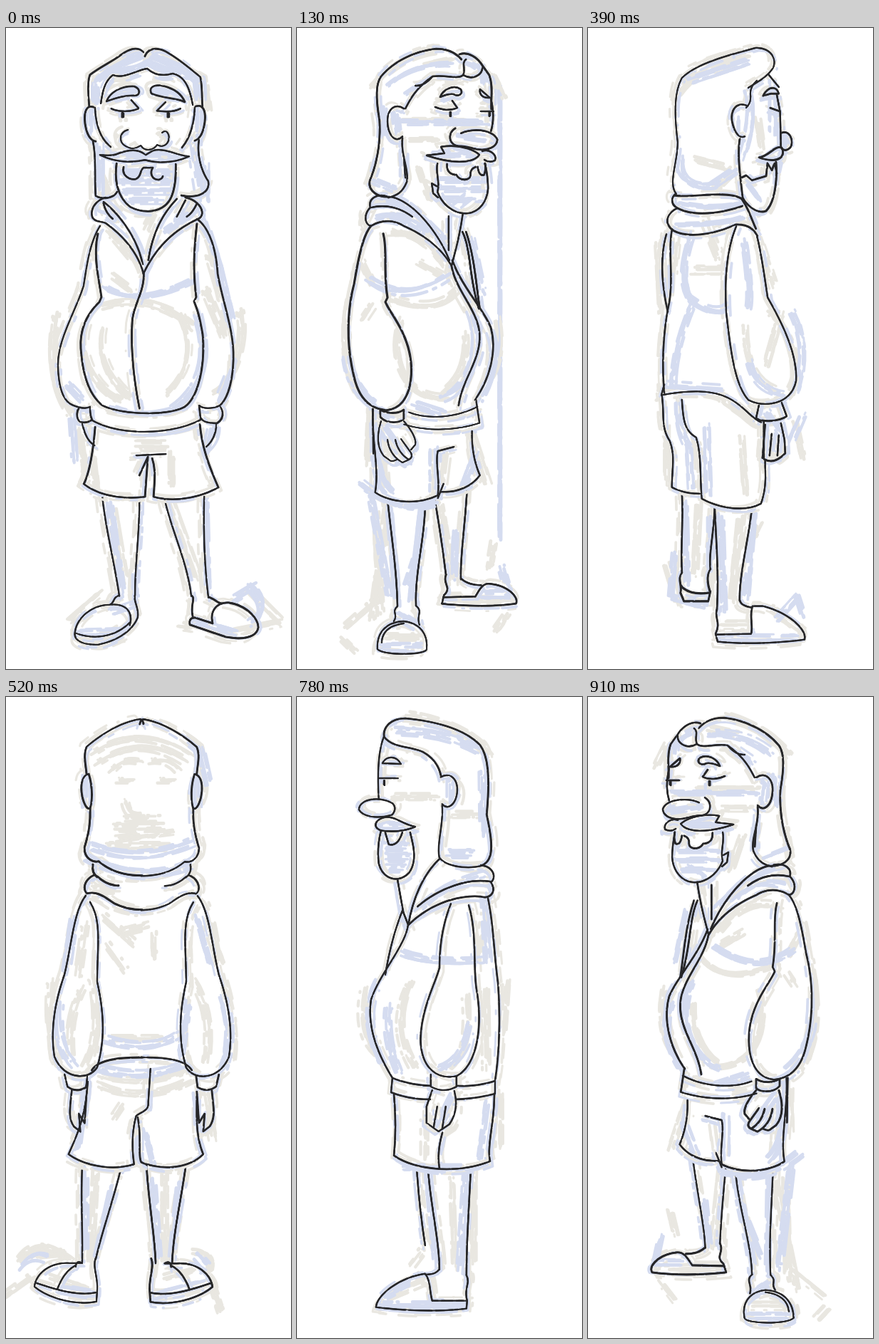
Animation, 400 px wide and 900 px high, one loop 1.04 s. Source, as an HTML page with a canvas:

```html
<!DOCTYPE html>
<html lang="en">
<head>
<meta charset="utf-8">
<title>Character turnaround</title>
<style>
html, body { margin: 0; height: 100%; overflow: hidden; background: #fff; }
canvas { display: block; width: 100vw; height: 100vh; }
</style>
</head>
<body>
<canvas id="stage" width="400" height="900"></canvas>
<script>
const W = 400, H = 900, STEP = 130;
const INK = '#262628', BLUE = '#d5dcf0', BEIGE = '#e9e7e1';
const stage = document.getElementById('stage').getContext('2d');

// Every view has an upper body and legs; each holds ink, blue and beige strokes.
const front = {
  top: {
    ink: [
      'M117,111C116,95 114,76 118,66C132,55 148,48 160,39C172,30 184,25 193,34M195,40C200,28 212,27 224,33C242,43 262,60 273,69C276,84 275,100 276,111',
      'M133,106C135,92 137,76 150,66C164,72 182,60 198,57C210,68 222,67 234,64C252,68 258,86 262,108',
      'M123,111C113,107 109,118 111,134C113,148 118,158 126,159M266,110C277,106 281,117 279,132C277,147 272,156 265,158',
      'M125,112C126,138 133,156 147,167M265,112C264,138 257,156 247,168',
      'M122,159C127,180 124,212 126,236C138,242 152,238 156,230M271,157C267,180 276,204 284,215C287,231 270,240 246,235',
      'M141,103C146,90 162,81 180,82C190,86 188,95 180,95C166,94 152,99 141,103ZM204,92C200,84 207,79 218,81C234,84 246,92 251,104C239,98 220,99 204,92Z',
      'M148,113C158,118 175,118 186,113M176,101L186,112M212,116C225,118 238,117 245,113M213,115L224,104',
      'M164,119v6m-1,-6v6m2,-5v5M228,119v6m-1,-6v6m2,-5v5',
      'M171,143C159,146 157,160 168,166C177,172 184,168 189,165C194,174 207,172 212,164C222,170 231,160 228,150C226,144 222,144 219,147',
      'M132,178C150,187 172,190 195,185C216,191 240,188 257,180C240,179 222,167 206,172L196,178C185,168 170,171 155,177C146,180 138,178 132,178Z',
      'M165,195C162,206 172,214 182,212C191,208 187,200 193,196H206C201,204 205,213 214,213Q219,212 220,208',
      'M155,190C151,218 159,240 174,251C187,258 206,260 219,252C233,244 239,224 238,191',
      'M140,238C124,242 117,258 122,267C127,273 133,271 140,274C164,291 186,316 193,345M137,244C163,264 186,300 192,332',
      'M252,238C272,242 281,260 272,267C240,282 214,302 193,345M240,240C216,265 205,294 200,326M137,246Q140,260 150,268M252,242L240,265M268,247Q262,260 254,265'
    ].concat([
      'M193,345C194,370 180,386 177,410C174,452 180,500 187,534',
      'M132,278C118,300 114,330 109,362C97,400 72,438 73,475C74,505 80,525 95,530C105,534 112,535 118,532',
      'M129,289C122,320 130,350 134,378L131,385C117,398 103,420 105,450C108,490 117,515 135,530C160,543 226,546 251,532C271,518 280,470 276,430C271,402 269,396 264,384L267,378C262,340 264,310 268,275',
      'M268,268C285,280 295,310 297,345C303,380 318,420 319,455C320,490 312,520 300,530C290,535 276,535 271,530',
      'M102,534C98,541 100,550 104,553C112,555 118,553 120,550M301,532C307,541 304,550 296,555C285,555 276,553 274,548',
      'M118,532Q117,543 121,551C160,574 235,571 273,550L271,532M107,556C110,571 116,582 124,586M295,556C295,571 288,582 281,588',
      'M125,560C122,600 115,630 109,640C130,657 165,662 195,658L199,602M183,600L224,598M199,602L187,628M205,604C211,622 208,640 207,658C236,666 270,660 298,645C285,615 275,590 272,556'
    ]),
    blue: ['M126,75Q150,55 188,42M205,42Q245,55 265,75L268,100M124,85L127,105M150,61Q180,64 197,50Q225,64 255,70', 'M117,115V148M273,115V148M150,98Q162,87 182,88M210,87Q230,86 245,97', 'M162,205H232M161,218H233M165,232H227M174,245H216', 'M150,181H243M131,168V228M262,170L270,222M279,195V238', 'M282,272L300,330L318,405M128,255L150,262M268,255L225,285', 'M140,365Q185,392 260,355M268,405C290,460 270,510 235,532M150,533Q195,550 245,532', 'M93,545L97,605M289,560L280,600M86,500L105,520M300,520L320,470'],
    beige: ['M115,62L170,32M220,30L278,65L284,110M145,65L175,55M130,192L145,230', 'M116,420C102,460 130,510 165,522M248,405C268,450 255,490 230,512M138,425C130,460 150,498 178,518M140,390Q210,370 265,420', 'M70,405C58,470 72,515 90,540M328,400C337,440 320,500 295,510M280,370L305,430M150,290L175,320M285,320L300,370', 'M120,600L125,645M183,585H222M230,600V640M102,570L110,625M150,350L170,365M195,280L205,260']
  },
  legs: {
    ink: [
      'M135,658C140,705 152,750 159,798M187,658C188,705 181,750 181,797M222,660C232,705 255,752 260,798M278,658C277,705 278,752 284,800',
      'M159,797C149,800 154,806 146,810M181,797C179,806 187,814 185,828C179,844 160,860 130,866C108,867 94,860 97,848C100,827 122,810 146,810C168,808 179,819 174,839M98,850C124,860 155,855 174,835',
      'M260,797C267,801 258,808 262,826M284,799C295,803 296,807 302,808M290,836C285,818 297,806 312,807C336,810 354,828 354,842C351,858 328,859 308,855L258,838Q256,828 265,828L290,836'
    ],
    blue: ['M145,670L162,790M279,665L282,790M180,770V800M103,850L165,848M150,820L180,810M265,834L320,850', 'M345,785Q375,815 345,835M325,800L350,785'],
    beige: ['M150,680L166,775M230,665L268,770M90,830L130,795M105,862L165,856M340,790L385,835L300,852M260,842L245,840']
  }
};

const quarter = {
  top: {
    ink: [
      'M130,237C108,238 97,223 104,210C112,190 118,160 116,130C111,100 110,80 118,68C137,45 168,32 195,29C214,29 224,36 231,44M228,37C240,32 254,42 260,52L270,66C276,82 272,100 273,114',
      'M152,113C157,104 164,86 190,68C208,65 225,73 233,66C237,57 230,49 237,44M233,66C246,74 261,66 260,54M190,68Q178,82 166,81',
      'M150,113C137,104 126,115 127,132C128,152 139,162 148,152M148,154C145,178 158,200 154,216C148,231 140,235 128,238M150,180L152,210',
      'M201,97C205,86 220,79 230,86C234,93 226,97 220,93C212,92 206,95 201,97ZM257,86L271,98C260,99 256,93 257,86ZM194,111C205,116 218,116 225,112L218,102M258,117H276M215,118v6m1,-6v6M270,118v6m1,-6v5',
      'M272,100Q278,126 272,145M230,148C244,141 275,142 281,157C280,170 262,174 246,169C238,167 232,166 226,166C212,164 211,147 222,141',
      'M182,179L207,176L202,167C222,163 246,169 256,178C247,192 214,190 182,179ZM260,173C270,169 281,178 278,186Q270,190 263,185',
      'M211,191Q210,204 222,206M224,206C230,216 244,214 244,206Q243,198 251,195M254,195Q256,209 263,206Q266,198 264,190',
      'M197,190C194,204 201,216 197,230C205,251 224,262 240,260C256,258 267,243 268,225Q268,210 264,190M196,222L189,218L191,232L198,238',
      'M126,236C109,232 100,242 103,252C93,262 95,276 104,278C120,268 138,270 150,278C181,291 205,312 217,334M104,252Q135,245 162,265M132,237C163,243 198,286 214,326M233,260C229,290 222,315 217,334M213,264L213,312',
      'M104,278C92,292 86,325 80,360C69,402 70,450 80,490C86,517 100,535 125,537C151,535 163,508 160,470C156,428 131,402 124,385L127,379C121,342 127,312 121,289'
    ].concat([
      'M117,536V546C125,556 145,555 150,549V536C142,542 126,542 117,536M217,334C222,365 248,390 255,420C264,461 232,490 227,530M218,326C232,364 260,392 272,420C282,455 269,496 250,522',
      'M232,286C244,310 241,350 255,394M237,286C249,322 251,360 256,392',
      'M157,540C185,551 226,547 253,532M150,557C185,568 226,565 256,555L251,522M106,535L107,598',
      'M118,552C111,574 113,590 122,601L129,606Q132,610 140,606M127,578Q130,600 148,610L157,606Q164,602 159,595L146,577M138,578Q142,597 157,606M150,552C160,563 168,577 166,585L160,592',
      'M107,535C105,580 116,620 110,652C131,667 171,670 198,656C201,632 194,610 198,594L221,588M246,566C245,590 250,612 257,628C245,645 222,653 202,651M198,660L206,640'
    ]),
    blue: ['M130,78Q165,48 215,50M240,48Q264,58 263,75M122,110L120,150M155,90L177,75M137,118L140,145', 'M203,215H260M202,228H262M208,242H255M225,250L240,238M195,179H245M230,154L270,160M150,134H265M150,175V210', 'M130,245L170,260L205,295M115,265Q150,255 180,285M110,215L135,225', 'M100,355Q150,390 210,350M242,400C265,460 235,510 205,520M270,430Q286,470 257,520M165,530L205,543', 'M70,460Q75,500 105,525M120,560L145,595M110,570Q108,630 130,650M192,590V645', 'M90,640Q145,685 195,666M250,600L235,640M245,300L260,370'],
    beige: ['M105,80Q140,40 190,25M275,65L290,95M110,185L103,225M180,50L215,42M150,128H235M160,155H195M170,195L185,240', 'M145,410C130,460 150,520 210,518M237,430C240,470 220,500 205,510M125,375Q195,405 225,365', 'M72,380Q55,470 88,520M280,410Q288,460 270,490M170,330L205,350M130,290Q170,285 200,325M90,330L105,360', 'M103,550L100,610M120,570L125,640M210,600L205,640M95,405L105,390M245,565L268,635M110,240L95,270']
  },
  legs: {
    ink: [
      'M127,662C132,710 140,760 141,812M180,664C180,715 165,765 167,811M193,660C200,700 205,735 209,768M239,640C237,690 229,740 230,774',
      'M141,812C132,821 143,823 136,833M167,811C178,820 167,824 172,838M113,872C112,850 124,834 150,833C171,835 185,850 182,873C176,881 121,881 113,872M119,863Q120,840 150,836',
      'M209,767C203,780 218,785 206,796L203,808C240,812 280,812 307,808C312,799 295,782 270,780C260,779 256,788 250,798L205,799M230,773Q240,782 258,782'
    ],
    blue: ['M132,675L143,800M177,680L163,800M120,870H174M145,825L169,840M225,710L223,770M265,795L300,795L290,760', 'M104,660L130,800M170,740L155,785'],
    beige: ['M110,680L117,820M125,680L105,830M200,670L218,770M70,840L110,805M65,860L80,875M125,855H170M215,800L285,804M280,845L294,825M275,725L270,755']
  }
};

const profile = {
  top: {
    ink: [
      'M126,237C104,230 112,195 118,165C114,122 114,86 127,68C151,42 200,33 232,30C252,30 264,42 262,56C250,72 225,69 208,77C191,86 184,100 182,112',
      'M182,112C166,104 157,118 159,134C161,151 172,159 180,150M180,152C178,180 188,206 184,225C174,239 142,241 126,237M262,56C270,76 271,110 269,143',
      'M238,94C244,82 259,82 264,93ZM242,114H268M261,117v7m1,-7v6M250,149C270,138 297,144 297,158C290,171 262,170 250,165Q243,156 250,149',
      'M218,182C238,178 246,166 262,169C279,174 276,188 260,188Q236,190 218,182ZM236,190Q242,210 255,207L260,190M225,190C220,210 215,230 226,246C240,262 263,257 269,234Q272,212 266,188',
      'M126,236C108,238 104,253 112,260C103,274 114,284 126,280C160,277 200,292 228,320M113,259C148,253 190,272 215,294M184,227C207,248 222,284 228,320M243,257L235,302L228,320',
      'M116,282C108,320 108,355 102,400C98,450 100,500 106,539M143,292C131,330 137,380 132,410C123,460 130,516 160,532C195,539 214,510 210,470C206,430 190,402 184,380C184,342 177,312 168,290',
      'M228,320C232,350 268,388 280,425C287,470 264,512 250,535M236,300Q252,340 260,390M106,539C124,545 142,547 160,546M196,546Q225,545 250,535L252,555C235,562 216,565 197,565M160,565Q132,564 106,557V539',
      'M160,532V547Q177,557 196,547V530M163,553Q156,580 170,600L185,610L202,598V575L194,552M175,575L180,606M187,575L192,604',
      'M107,557C107,600 118,630 113,652C150,668 213,668 248,644Q244,605 248,558M180,612Q188,640 184,662'
    ],
    blue: ['M130,76Q180,48 245,48M125,110L124,190M170,120V145M140,220H175M232,210H260M229,225H260M236,240H255', 'M228,182H268M125,250Q175,260 210,295M120,280L115,370M255,435Q260,480 240,525M125,370Q195,375 235,360', 'M140,460Q150,510 180,520M165,560L185,600M115,570L125,645M150,660H230M270,400Q295,450 265,510'],
    beige: ['M115,80Q150,38 230,25M130,165H165M190,140H250M120,410L118,520M225,400Q255,460 220,520', 'M120,300L130,360M147,420Q140,500 170,520M290,410Q302,470 270,500M205,590V645M100,560V630M90,400L95,470']
  },
  legs: {
    ink: ['M140,662C142,710 146,762 146,812M200,662C197,710 184,765 184,804M216,660Q212,720 204,770', 'M146,812C140,824 150,830 145,848L146,859C185,864 235,862 273,857C272,842 244,816 204,810C196,820 198,835 194,848H146M184,804Q190,812 204,811'],
    blue: ['M146,670L155,805M199,675L188,790M150,854H265M230,825L260,840'],
    beige: ['M167,680L163,800M136,680L136,790M205,820L258,842M210,780L225,800']
  }
};

const rear = {
  top: {
    ink: [
      'M124,233C112,218 126,190 126,160C121,120 121,90 132,70C155,48 200,38 235,28C255,27 266,42 260,56C251,70 237,76 225,84M237,74Q228,82 228,92Q230,105 222,112M254,66L268,83',
      'M246,95C252,82 265,80 268,92L257,92ZM256,112L270,117M265,92L270,118L271,166M272,147C284,142 290,160 284,168Q278,174 272,169',
      'M240,182C256,179 261,165 272,168C279,184 262,190 240,182ZM252,190L258,200L262,190L265,204M264,188C266,215 262,245 250,257C238,262 223,250 217,238M216,210L222,207L230,214L250,208L252,190',
      'M224,109C208,103 200,115 202,130C205,146 212,156 220,152M213,155C209,180 214,210 217,238',
      'M123,233C116,238 117,249 126,253C115,257 106,270 116,281C130,296 175,292 207,276C226,275 234,284 238,292M126,253C152,267 195,258 217,250M121,235C145,239 197,227 216,240C226,254 230,270 236,282',
      'M118,282C112,310 120,350 114,385C104,430 104,480 107,512M110,289C101,320 103,360 112,398M107,500L103,515C140,508 170,508 190,516C215,525 230,549 243,553',
      'M208,278C195,310 191,350 194,400C200,450 205,500 225,522C246,533 285,530 292,495C294,455 270,410 252,378C248,350 242,310 237,292',
      'M240,530L236,548C245,554 270,552 279,545L272,526M247,552V605C258,612 268,606 277,597L276,578L271,555M258,570L255,600M268,572L266,600',
      'M104,516C108,545 102,560 115,580C123,600 118,620 118,645Q135,654 157,654M132,522C134,550 135,565 152,575C160,600 157,630 160,661C185,675 221,680 243,668C253,640 248,622 249,607M249,557L245,604'
    ],
    blue: ['M145,72L225,45M225,90Q235,125 216,180M130,180Q125,225 175,220L205,200M208,125V145M260,75V145', 'M250,183H270M225,220L240,240M265,200L275,155M130,245Q175,255 215,245M125,275Q185,275 215,265', 'M145,290Q125,350 145,380Q180,405 195,390M220,300Q230,370 225,390M145,390Q120,450 120,500M112,500L185,505', 'M225,470Q235,510 270,515M285,400Q310,450 290,510M300,545L285,580M250,540L270,570M165,560L168,655M125,525Q125,570 140,590L143,645'],
    beige: ['M122,100Q150,50 225,35M180,60L205,50M155,185L195,195M240,130L245,165M180,225L205,200', 'M100,300L105,395M165,270L185,320M125,300L120,350M240,300L260,360M150,340H190', 'M255,400Q305,450 285,510M220,420Q220,490 260,505M270,400L250,470M185,520L235,555M110,560L110,630M215,575L220,650M290,555L300,600']
  },
  legs: {
    ink: [
      'M132,655C134,690 130,730 132,765M178,672C177,710 169,740 172,760M178,674C180,720 184,770 181,818M230,676C225,720 212,770 213,804',
      'M132,765C125,774 133,782 130,793L135,805H169L172,791M130,782Q140,797 171,793M172,760Q165,770 171,790',
      'M181,816C177,829 187,835 179,851L182,862C220,866 270,864 304,859C308,845 280,820 245,812H231C226,825 232,840 229,851L181,852M213,804Q215,812 230,814'
    ],
    blue: ['M135,670L138,780M170,690V760M186,690L190,820M232,680L222,800M120,740L115,800L160,812M185,857H290M265,830L292,800L300,825'],
    beige: ['M155,670L150,765M213,690L202,800M110,755L125,805M190,838H225M260,820L300,848M225,730L240,700']
  }
};

const backHalf = [
  'M193,38Q192,32 188,31C160,35 130,55 113,70C108,82 112,95 113,108M116,108C106,110 104,125 107,140C110,153 115,159 118,156C122,145 121,122 116,108',
  'M118,156C119,180 115,195 110,212C110,227 122,233 130,231C148,246 168,251 191,251M122,235Q120,247 128,253M124,250C108,257 108,272 114,276C130,272 142,284 152,290Q170,299 191,299M128,252Q142,265 158,265',
  'M112,279C95,300 92,350 82,390C68,430 62,470 68,505C80,536 115,540 128,520C140,480 137,440 128,400C128,350 135,315 118,288',
  'M82,530L86,547Q98,556 112,548L114,532M92,552C90,575 86,590 95,603L104,610L102,585L110,598L113,554M120,524C130,508 160,506 191,506'
];
const backFoot = ['M107,795H90C62,793 42,810 40,828C60,845 100,855 127,849L128,836C100,842 70,832 43,823M98,798C86,804 78,816 72,832M126,788C121,800 130,815 128,836M107,795Q99,790 98,800'];
const back = {
  top: {
    ink: ['M115,540C112,590 100,615 88,642C110,658 150,666 180,656C176,630 178,605 183,588C195,580 201,580 200,568L203,522', 'M185,590C191,620 185,645 190,653C215,664 255,664 277,642C266,615 268,590 268,560'],
    twin: backHalf, axis: 381,
    blue: ['M125,210Q190,235 260,205M112,115V150M269,115V150M115,225Q190,265 262,235M275,75L285,120', 'M95,310L85,380M75,430Q70,490 95,515M305,420Q322,470 305,520M140,480Q200,500 240,475M130,520Q195,540 250,515', 'M110,555L100,630M265,560L270,605M195,610L205,650M255,430L245,500M268,310L285,370'],
    beige: ['M125,75Q190,35 260,80M130,90Q190,50 250,88M150,100Q165,84 187,88M206,88Q228,84 242,100M160,115H178M218,115H236M168,145Q172,166 190,164', 'M155,183H220M170,172H215M145,210H235M125,270H160M165,330L205,320M210,335V365M145,350L170,385M140,310L180,345', 'M120,395Q135,470 110,515M262,400Q290,440 280,510M62,400Q55,470 75,510M110,320L100,390M280,320L300,370M105,410Q85,450 90,500', 'M130,545Q195,575 265,535M150,480H215M108,560L108,605M280,560L290,620M150,590L160,575M130,530Q190,550 250,525M155,200L230,190']
  },
  legs: {
    ink: ['M107,660C105,710 108,750 107,795M162,660C150,710 135,750 126,790', 'M197,656C200,710 208,750 210,795M252,660C245,710 235,750 233,795'],
    twin: backFoot, axis: 330,
    blue: ['M112,670V780M150,690L130,780M207,680L215,790M245,685L235,780M80,832L125,840M210,842L275,825M25,800Q40,780 60,790M270,785L283,800'],
    beige: ['M125,670L118,790M222,670L222,790M20,790Q45,755 90,790M0,840L35,815M30,785L80,780M265,780Q290,780 285,805M290,830L300,860M65,815L110,830M225,815L260,805']
  }
};

// Mirrored views: axis is twice the centre line, lean slides the feet sideways.
const frames = [
  { view: front }, { view: quarter, guide: ['M285,82V717'] }, { view: profile }, { view: rear }, { view: back },
  { view: rear, axis: 383, lean: -.058 },
  { view: profile, axis: 384, lean: 0 },
  { view: quarter, axis: 386, lean: .07 }
];

let seed;
const random = () => (seed = seed * 16807 % 2147483647) / 2147483647;
const spread = n => (random() - .5) * 2 * n;

function brush(c, paths, color, { width, wobble, passes, dash, gap, dx = 0, dy = 0 }) {
  c.strokeStyle = color;
  for (const d of paths) {
    const path = new Path2D(d);
    for (let i = 0; i < passes; i++) {
      c.save();
      c.translate(dx + spread(wobble), dy + spread(wobble));
      c.lineWidth = width * (.75 + random() * .5);
      c.setLineDash([dash * (.5 + random()), gap * (.4 + random()), dash * random(), gap * random()]);
      c.lineDashOffset = random() * 100;
      c.stroke(path);
      c.restore();
    }
  }
}

const halo = { width: 3.5, wobble: 7, passes: 7, dash: 26, gap: 36 };
const wash = { width: 4, wobble: 6, passes: 7, dash: 30, gap: 18 };
const pencil = { width: 2, wobble: .5, passes: 3, dash: 40, gap: 4 };

function drawPart(c, { ink, blue, beige, twin = [], axis = 0 }) {
  const outline = (color, style) => {
    brush(c, ink.concat(twin), color, style);
    if (!axis) return;
    c.save();
    c.transform(-1, 0, 0, 1, axis, 0);
    brush(c, twin, color, style);
    c.restore();
  };
  outline(BEIGE, { ...halo, dx: -2, dy: 1 });
  brush(c, beige, BEIGE, wash);
  outline(BLUE, { ...halo, wobble: 5, passes: 3, dx: 1, dy: 2 });
  brush(c, blue, BLUE, wash);
  outline(INK, pencil);
}

function render({ view, axis, lean, guide = [] }) {
  const sheet = document.createElement('canvas');
  sheet.width = W;
  sheet.height = H;
  const c = sheet.getContext('2d');
  c.fillStyle = '#fff';
  c.fillRect(0, 0, W, H);
  c.lineCap = c.lineJoin = 'round';
  seed = 4711;
  brush(c, guide, BLUE, { ...wash, wobble: 2 });
  if (axis) c.setTransform(-1, 0, lean, 1, axis - lean * 650, 0);
  drawPart(c, view.legs);
  if (axis) c.setTransform(-1, 0, 0, 1, axis, 0);
  drawPart(c, view.top);
  return sheet;
}

const sheets = frames.map(render);

function tick() {
  stage.drawImage(sheets[Math.floor(performance.now() / STEP) % sheets.length], 0, 0);
  requestAnimationFrame(tick);
}
tick();
</script>
</body>
</html>
```
